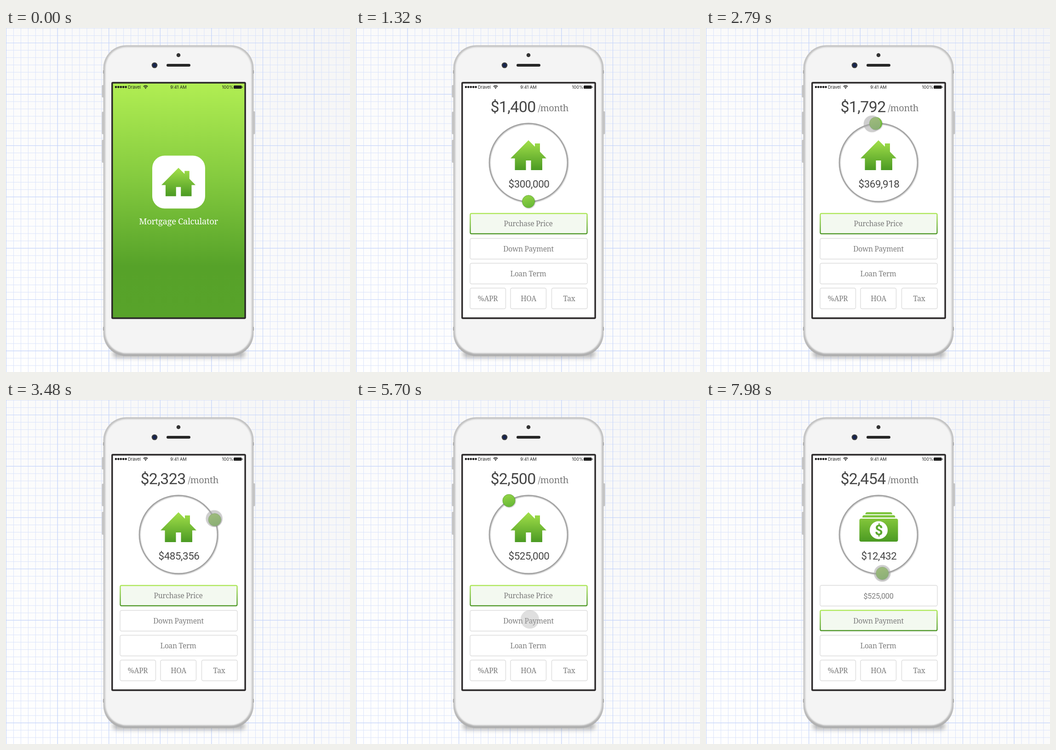
Write an HTML page that moves like this. It is 748x748 px and loops after 8000 ms.

```html
<!DOCTYPE html>
<html lang="en">
<head>
<meta charset="utf-8">
<title>Mortgage Calculator</title>
<style>
@property --a { syntax: "<angle>"; inherits: false; initial-value: 0deg; }
html, body { margin: 0; width: 100%; height: 100%; overflow: hidden; background: #fff; }
svg { display: block; width: 100vw; height: 100vh; }
text { font-family: "Roboto Slab", "Noto Serif", serif; letter-spacing: -.02em; }
.mid { text-anchor: middle; }
.num { font-family: "Roboto Slab", Roboto, sans-serif; }
.bar text { font: 9.3px Inter, Roboto, sans-serif; letter-spacing: 0; fill: #1c1c1c; }
.label { font-size: 15.6px; font-weight: 300; fill: #7c7c7c; text-anchor: middle; }
.label.num { font-size: 16.4px; font-weight: 400; }
.box rect { fill: #fff; stroke: #dcdcdc; stroke-width: 1.4; }
.active { fill: #f3f9f0; stroke: url(#edge); stroke-width: 2.2; }
.touch { fill: #a8a8a8; fill-opacity: .56; }

/* one shared 8 s loop; percentages are ms / 80 */
.splash, .ui, .before, .after, .value, .orbit, .drag, .tap { animation: 8s linear infinite; }
.splash { animation-name: splash; }
.ui { animation-name: ui; }
.before { animation-name: before; }
.after { animation-name: after; }
.value { animation-name: value; }
.drag { animation-name: drag; }
.tap { animation-name: tap; }
.orbit { transform: rotate(var(--a)) translateY(85px) rotate(calc(-1 * var(--a))); }
.knob { animation-name: knob; }
.finger { animation-name: finger; }

@keyframes splash { 0%, 5.75% { opacity: 1 } 10%, 100% { opacity: 0 } }
@keyframes ui { 0%, 10.875% { opacity: 0 } 16.5%, 100% { opacity: 1 } }
@keyframes before { 0%, 72.875% { opacity: 1 } 79.125%, 100% { opacity: 0 } }
@keyframes after { 0%, 72.875% { opacity: 0 } 79.125%, 100% { opacity: 1 } }
@keyframes value { 0%, 72.875% { opacity: 1 } 76.625%, 77.25% { opacity: 0 } 81.75%, 100% { opacity: 1 } }
@keyframes drag {
  0%, 19.875% { opacity: 0; transform: scale(1.3) }
  24.75%, 51.875% { opacity: 1; transform: none }
  55.625%, 90% { opacity: 0; transform: scale(1.3) }
  95%, 100% { opacity: 1; transform: none }
}
@keyframes tap {
  0%, 68.375% { opacity: 0; transform: scale(1.3) }
  72.75%, 73.75% { opacity: 1; transform: none }
  78.25%, 100% { opacity: 0; transform: scale(1.3) }
}
@keyframes knob {
  0% { --a: 0deg }
  25.72% { --a: 0deg; animation-timing-function: cubic-bezier(.333, 0, .667, 1) }
  49.875% { --a: -570deg; animation-timing-function: step-end }
  72.825% { --a: -210deg; animation-timing-function: cubic-bezier(.333, 0, .667, 1) }
  82.5% { --a: 0deg }
  95% { --a: 0deg; animation-timing-function: cubic-bezier(.333, 0, .667, .333) }
  99.75%, 100% { --a: -5.6deg }
}
@keyframes finger {
  0% { --a: 0deg }
  25.454% { --a: 0deg; animation-timing-function: cubic-bezier(.333, 0, .667, 1) }
  49.875% { --a: -570deg; animation-timing-function: step-end }
  72.825%, 95% { --a: 0deg; animation-timing-function: cubic-bezier(.333, 0, .667, .333) }
  99.75%, 100% { --a: -5.6deg }
}
</style>
</head>
<body>
<svg viewBox="0 0 748 748">
  <defs>
    <linearGradient id="paper" x1="1" y1="0" x2="0" y2="1">
      <stop offset="0" stop-color="#f5f5f5"/><stop offset=".6" stop-color="#fcfcfc"/><stop offset="1" stop-color="#fff"/>
    </linearGradient>
    <pattern id="fine" width="15.943" height="15.943" y=".1" patternUnits="userSpaceOnUse">
      <path d="M.5 0V16M0 .5H16" stroke="#dae3fa" fill="none"/>
    </pattern>
    <pattern id="bold" width="111.6" height="111.6" y="32" patternUnits="userSpaceOnUse">
      <path d="M.5 0V111.6M0 .5H111.6" stroke="#c3d3fa" fill="none"/>
    </pattern>
    <linearGradient id="rim" x2="0" y2="1">
      <stop offset="0" stop-color="#c2c2c2"/><stop offset=".9" stop-color="#cbcbcb"/><stop offset="1" stop-color="#adadad"/>
    </linearGradient>
    <linearGradient id="field" x2="0" y2="1">
      <stop offset="0" stop-color="#b1ee53"/><stop offset=".4" stop-color="#85cb3f"/>
      <stop offset=".78" stop-color="#56a229"/><stop offset="1" stop-color="#58a32a"/>
    </linearGradient>
    <linearGradient id="green" x2="0" y2="1">
      <stop offset="0" stop-color="#a3e04a"/><stop offset="1" stop-color="#4b9a23"/>
    </linearGradient>
    <linearGradient id="bill" x2="0" y2="1">
      <stop offset="0" stop-color="#83c63a"/><stop offset="1" stop-color="#4b9a23"/>
    </linearGradient>
    <linearGradient id="dot" x2=".3" y2="1">
      <stop offset="0" stop-color="#97d648"/><stop offset="1" stop-color="#6aba37"/>
    </linearGradient>
    <linearGradient id="edge" x2="0" y2="1">
      <stop offset="0" stop-color="#ade955"/><stop offset="1" stop-color="#4c9824"/>
    </linearGradient>
    <filter id="soft"><feGaussianBlur stdDeviation="1.5"/></filter>
    <filter id="haze" y="-2" height="5"><feGaussianBlur stdDeviation="5"/></filter>
    <filter id="lift" x="-.3" y="-.3" width="1.6" height="1.6">
      <feDropShadow dx=".7" dy="1" stdDeviation="1" flood-opacity=".35"/>
    </filter>
    <path id="house" fill="url(#green)"
      d="M375 244L389 258V251H400V269L414 283.500H405V309H380.500V288H369.500V309H345.500V283.500H336Z"/>
  </defs>

  <rect width="748" height="748" fill="url(#paper)"/>
  <rect width="748" height="748" fill="url(#fine)"/>
  <rect width="748" height="748" fill="url(#bold)"/>

  <!-- phone -->
  <rect x="232" y="700" width="288" height="17" rx="8" fill="#777" opacity=".5" filter="url(#haze)"/>
  <g fill="#c3c3c3">
    <rect x="208.500" y="124" width="5" height="27" rx="2"/>
    <rect x="208.500" y="182" width="5" height="49" rx="2"/>
    <rect x="208.500" y="243" width="5" height="50" rx="2"/>
    <rect x="536.500" y="181" width="5" height="50" rx="2"/>
  </g>
  <rect x="211.500" y="37.500" width="327" height="676" rx="50" fill="url(#rim)"/>
  <path d="M212 92v7M538 92v7M212 650v8M538 650v8" stroke="#a9a9a9" stroke-width="2"/>
  <rect x="216" y="41.500" width="318" height="666" rx="46" fill="#f4f4f4" filter="url(#soft)"/>
  <circle cx="375" cy="59" r="4.300" fill="#333"/>
  <circle cx="323" cy="81" r="6.300" fill="#3c3c3c"/>
  <circle cx="323" cy="81" r="4" fill="#16244f"/>
  <rect x="349" y="78" width="52" height="6" rx="3" fill="#272727"/>
  <rect x="231" y="119" width="289" height="512" fill="#fff"/>

  <g class="ui">
    <text id="month" class="num mid" x="341.500" y="183" font-size="34" fill="#454545">$1,400</text>
    <text x="395.500" y="181" font-size="20" font-weight="300" fill="#777">/month</text>

    <circle cx="375" cy="292.500" r="85" fill="none" stroke="#a0a0a0" stroke-width="2.400" filter="url(#lift)"/>
    <use class="before" href="#house"/>
    <g class="after">
      <path d="M346.500 248.500q0-4.500 4-4.500H401q4 0 4 4.500ZM340 255.500q0-5 4-5H407.500q4 0 4 5Z" fill="#7cc43a"/>
      <rect x="333.500" y="258" width="84" height="50" rx="4" fill="url(#bill)"/>
      <circle cx="375.500" cy="283" r="19.500" fill="#fff"/>
      <text class="num mid" x="375.500" y="294" font-size="31" font-weight="700" fill="#5aa82c">$</text>
    </g>
    <text id="value" class="value num mid" x="376" y="347" font-size="22.4" fill="#454545">$300,000</text>

    <g class="box">
      <rect x="248" y="403" width="255" height="45" rx="3.500"/>
      <rect x="248" y="457.500" width="255" height="45" rx="3.500"/>
      <rect x="248" y="511.500" width="255" height="45" rx="3.500"/>
      <rect x="248" y="565.500" width="77.500" height="45" rx="3.500"/>
      <rect x="336" y="565.500" width="77.500" height="45" rx="3.500"/>
      <rect x="425.500" y="565.500" width="77.500" height="45" rx="3.500"/>
    </g>
    <g class="before">
      <rect class="active" x="248.500" y="403.300" width="254" height="44" rx="2.500"/>
      <text class="label" x="374.500" y="430.500">Purchase Price</text>
    </g>
    <g class="after">
      <rect class="active" x="248.500" y="457.400" width="254" height="44" rx="2.500"/>
      <text class="label num" x="375" y="431.500">$525,000</text>
    </g>
    <text class="label" x="375" y="485.500">Down Payment</text>
    <text class="label" x="374.500" y="539.500">Loan Term</text>
    <text class="label" x="286.500" y="594">%APR</text>
    <text class="label" x="375" y="594">HOA</text>
    <text class="label" x="463.500" y="594">Tax</text>

    <g transform="translate(375 292.300)">
      <g class="orbit knob"><circle r="13.500" fill="url(#dot)" stroke="#5aa52d" stroke-width=".8" filter="url(#lift)"/></g>
      <g class="orbit finger"><circle class="touch drag" r="18.300"/></g>
    </g>
    <g transform="translate(378 477)"><circle class="touch tap" r="18.300"/></g>
  </g>

  <g class="splash">
    <rect x="231" y="119" width="289" height="512" fill="url(#field)"/>
    <rect x="318" y="277.500" width="115" height="115" rx="27" fill="#fff"/>
    <use href="#house" transform="translate(18.750 72.200) scale(.95)"/>
    <text class="mid" x="375" y="426.500" font-size="18.5" fill="#fff">Mortgage Calculator</text>
  </g>

  <rect x="230.800" y="119" width="289.300" height="512" rx="1.500" fill="none" stroke="#2a2728" stroke-width="3.400"/>

  <g class="bar" fill="#1c1c1c">
    <path d="M239 128.300h22" stroke="#1c1c1c" stroke-width="4.700" stroke-linecap="round" stroke-dasharray="0 5.400"/>
    <text x="265" y="132">Dravel</text>
    <path d="M298.800 127.400q4.700-4.200 9.400 0M300.600 129.300q2.900-2.600 5.800 0" fill="none" stroke="#1c1c1c" stroke-width="1.500"/>
    <circle cx="303.500" cy="131" r="1.200"/>
    <text class="mid" x="375" y="132">9:41 AM</text>
    <text x="469.500" y="132">100%</text>
    <rect x="495" y="125" width="17.500" height="7" rx="1.600"/>
    <rect x="513" y="127" width="1.300" height="3" rx=".6"/>
  </g>
</svg>
<script>
const LOOP = 8000, TICK = 30;
const month = document.getElementById("month");
const value = document.getElementById("value");

const part = (t, from, to) => Math.min(1, Math.max(0, (t - from) / (to - from)));
const smooth = u => u * u * (3 - 2 * u);
const money = n => "$" + Math.round(n).toLocaleString("en-US");

let start;
function draw(now) {
  start ??= now;
  let t = (now - start) % LOOP;
  t -= t % TICK;
  const saved = part(t, 7600, 7980) ** 2;
  const price = 300000 + 225000 * smooth(part(t, 2082.31, 3990));
  month.textContent = money(1400 + 1100 * smooth(part(t, 1980, 3990)) - 46 * saved);
  value.textContent = money(t < 6150 ? price : 12432 * saved);
  requestAnimationFrame(draw);
}
requestAnimationFrame(draw);
</script>
</body>
</html>
```
